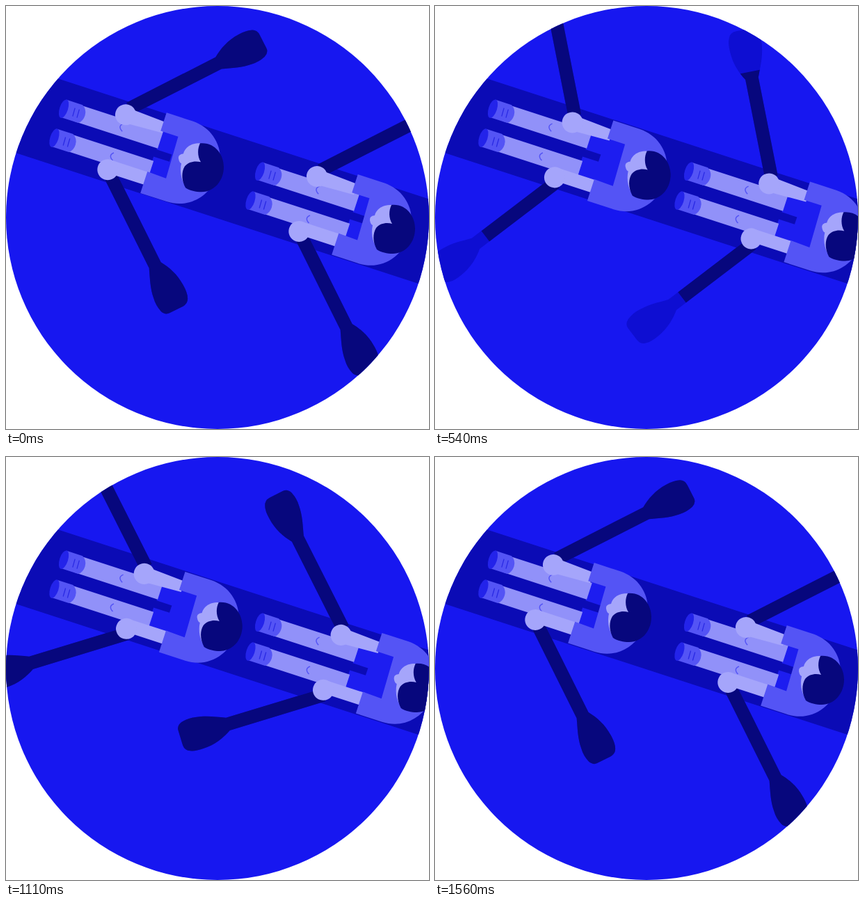
An HTML page that plays this animation: 608x608 px, repeating every 2.13 s.

```html
<!DOCTYPE html>
<html lang="en">
<head>
<meta charset="utf-8">
<title>Rowers</title>
<style>
  html, body { margin: 0; width: 100%; height: 100%; overflow: hidden; background: #fff; }
  svg { display: block; width: 100vw; height: 100vh; }
  .water { fill: #1717f0; }
  .boat { fill: #0b0bb5; }
  .dark { fill: #07077d; }
  .wet { fill: #0e0ed2; }
  .shirt { fill: #5454f5; }
  .leg { fill: #9191f9; }
  .skin { fill: #a5a5fb; }
  .shorts { fill: #1d1df0; }
  .sole { fill: #2323ea; }
  .line { fill: none; stroke: #2a2ae4; stroke-width: 1.3; }
  .knee { fill: none; stroke: #5454f5; stroke-width: 1.5; }
</style>
</head>
<body>
<svg viewBox="0 0 608 608">
  <defs>
    <clipPath id="disc"><circle cx="304" cy="304" r="304"/></clipPath>
    <path id="oar" d="M2-9.5H146C158-17 172-23 190-23.5Q203-24 209-21Q217-18 217-9V12Q217 19 209 22Q198 25 188 23C172 21 160 15 146 9.5H2Z"/>
    <g id="leg">
      <path class="leg" d="M18-12.5H145V12.5H18Z"/>
      <path class="shirt" d="M-1-13.5H23Q31-9 31 0Q31 9 25 13H-1Z"/>
      <ellipse class="sole" cx="-1" rx="6" ry="13.8"/>
      <path class="line" d="M14-6L14.500 6.500M20.500-6L21 6.500"/>
      <path class="knee" d="M87-6Q80 0 89 5"/>
    </g>
    <g id="legs" transform="translate(84 148) rotate(18)">
      <path class="shorts" d="M144-14H215V60H143V25.500H167V14.500H144Z"/>
      <use href="#leg"/>
      <use href="#leg" y="44"/>
    </g>
    <g id="torso">
      <g transform="translate(84 148) rotate(18)">
        <path class="skin" d="M116-27L174-24V-8L116-5ZM116 52H174V71H116Z"/>
        <circle class="skin" cx="115.500" cy="-16.500" r="15"/>
        <circle class="skin" cx="115.500" cy="66.500" r="15"/>
        <path class="shirt" d="M170.500-37.500H210C245-37 268-10 268 23S245 84 210 84H170.500V51.500L199 52.500L197-10H170.500Z"/>
      </g>
      <path class="skin" d="M306 209C290 209 284 217 282 224Q274 225 275 231Q276 237 279 238C276 252 280 266 287 273L315 250Z"/>
      <path class="dark" d="M306 209C328 207 340 226 340 243C340 264 325 279 308 279C300 279 291 277 285 273C279 262 279 250 284 242C290 235 299 234 307 236C302 228 302 217 306 209Z"/>
    </g>
  </defs>
  <g clip-path="url(#disc)">
    <rect class="water" width="608" height="608"/>
    <path class="boat" d="M-40 67L660 294.400V421L-40 193.600Z"/>
    <g id="drops" class="dark"></g>
    <g id="crew"></g>
  </g>
</svg>
<script>
const LOOP = 2130, STEP = 30, RETURN = 1080, REACH = 480;
const WAKE = [275, 94];
const $ = id => document.getElementById(id);

function add(parent, tag, attrs = {}) {
  const el = document.createElementNS('http://www.w3.org/2000/svg', tag);
  for (const k in attrs) el.setAttribute(k, attrs[k]);
  return parent.appendChild(el);
}

const clamp = x => Math.min(1, Math.max(0, x));
const sine = x => (1 - Math.cos(Math.PI * clamp(x))) / 2;
const easeOut = (x, power) => 1 - (1 - clamp(x)) ** power;
// Steady rise that settles softly at 1
const settle = x => x / (1 + x ** 20) ** (1 / 20);

// from, sweep: degrees; pace: ms per stroke; snap: sharpness of the return; depth: length under water
const sides = [
  { pivot: [202.5, 160], from: -27, sweep: -114, pace: 830, snap: 3.7, depth: 79, splash: [321, 5], axis: 109.5 },
  { pivot: [176, 253.5], from: 63.5, sweep: 116.3, pace: 793, snap: 2.4, depth: 112, splash: [171, 434], axis: -89 }
];

// seat: fixed offset; rest: offset when leaning back; out, back: reach before and after the stroke
const rowers = [
  { seat: [0, 0], rest: [0, 0], out: [-27, -11.7], back: [-29, -13] },
  { seat: [282, 90], rest: [283, 88], out: [-35, -11], back: [-35, -11] }
];

const drops = [];
rowers.forEach((r, n) => {
  const g = add($('crew'), 'g');
  add(g, 'use', { href: '#legs', x: r.seat[0], y: r.seat[1] });
  r.body = add(g, 'g');
  r.oars = sides.map((side, k) => {
    const id = `dry${n}${k}`;
    const clip = add(add(r.body, 'clipPath', { id }), 'rect', { x: -5, y: -30, height: 60 });
    const oar = add(r.body, 'g');
    add(oar, 'use', { href: '#oar', class: 'wet' });
    add(add(oar, 'g', { 'clip-path': `url(#${id})` }), 'use', { href: '#oar', class: 'dark' });

    // Two pairs of drops fly off in a V
    for (const wing of [-1, 1]) for (const twin of [-1, 1]) {
      drops.push({
        el: add($('drops'), 'circle'),
        start: side.splash.map((v, i) => v + n * WAKE[i]),
        angle: (side.axis + 45 * wing + 6.5 * twin) * Math.PI / 180,
        range: 96 + 8 * wing
      });
    }
    return { side, oar, clip };
  });
  add(r.body, 'use', { href: '#torso' });
});

function draw(t) {
  const back = (t - RETURN) / REACH;
  const pull = 1 - sine(t / 630), slide = sine(back);
  const dip = clamp((t - 90) / 110) - sine((t - 500) / 150);

  for (const r of rowers) {
    const [x, y] = r.rest.map((v, i) => v + r.out[i] * pull + r.back[i] * slide);
    r.body.setAttribute('transform', `translate(${x} ${y})`);
    for (const { side, oar, clip } of r.oars) {
      const turn = settle(t / side.pace) * (1 - easeOut(back, side.snap));
      oar.setAttribute('transform', `translate(${side.pivot}) rotate(${side.from + side.sweep * turn})`);
      clip.setAttribute('width', 227 - side.depth * dip);
    }
  }

  const flight = (t - 150) / 150, fly = easeOut(flight, 2);
  for (const { el, start, angle, range } of drops) {
    el.setAttribute('cx', start[0] + Math.cos(angle) * range * fly);
    el.setAttribute('cy', start[1] + Math.sin(angle) * range * fly);
    el.setAttribute('r', flight > 0 && flight < 1.2 ? 4 - 2.4 * clamp(flight) : 0);
  }
}

function tick() {
  const t = performance.now() % LOOP;
  draw(Math.floor(t / STEP) * STEP);
  requestAnimationFrame(tick);
}
tick();
</script>
</body>
</html>
```
